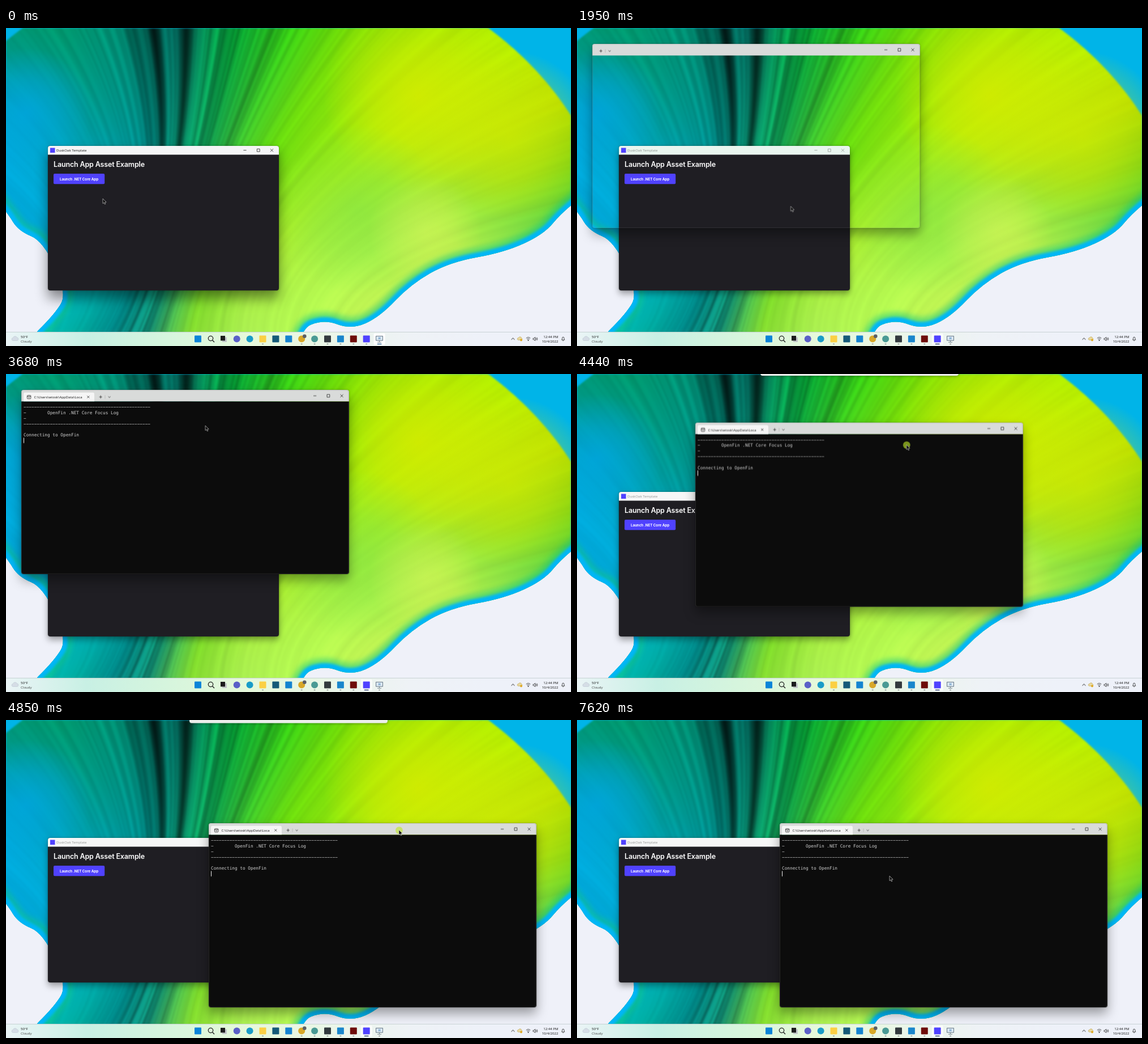
An HTML page with a canvas that plays this animation: 998x561 px, repeating every 8000 ms.

```html
<!DOCTYPE html>
<html lang="en">
<head>
<meta charset="utf-8">
<title>Desktop app launch</title>
<style>
  html, body { margin: 0; width: 100%; height: 100%; overflow: hidden; background: #eff1f9; }
  #stage { position: relative; width: 998px; height: 561px; overflow: hidden; }
  #stage > * { position: absolute; left: 0; top: 0; }
  svg { display: block; }
  text { font-family: "Open Sans", "Noto Sans", sans-serif; font-size: 6.1px; }
  .inter { font-family: Inter, Roboto, sans-serif; fill: #fff; }
  .heading { font-size: 12.5px; font-weight: 600; letter-spacing: -.16px; }
  .button { font-size: 6.2px; font-weight: 700; text-anchor: middle; }
  .mono { font-family: "DejaVu Sans Mono", "Noto Sans Mono", monospace; font-size: 7.76px; fill: #d0d0d0; }
  .line { fill: none; stroke: #222; stroke-width: .8; }
  #stage > .win { overflow: hidden; border-radius: 4px; }
  #stage > #app { left: 74px; top: 208px; width: 407.5px; height: 255.3px; }
  #stage > #term { left: 27px; top: 27.5px; width: 578.5px; height: 325px;
    box-shadow: 0 11px 20px rgba(0,0,0,.36), 0 0 3px rgba(0,0,0,.3); }
  #stage > #snap { left: 324px; top: -8px; width: 349.5px; height: 8px; border-radius: 0 0 4px 4px;
    background: #eceeec; box-shadow: 0 1px 4px rgba(0,0,0,.35); }
  #stage > #bar { top: 536px; }
</style>
</head>
<body>
<div id="stage">
  <canvas id="wall" width="998" height="561"></canvas>
  <div id="app" class="win"></div>
  <div id="term" class="win"></div>
  <div id="snap"></div>
  <svg id="bar" width="998" height="25" viewBox="0 536 998 25"></svg>
  <svg id="mouse" width="30" height="30" viewBox="-15 -15 30 30">
    <circle id="halo" cx=".4" cy=".6" r="6.4" fill="#bee628" fill-opacity=".62"/>
    <path id="arrow" d="M0 0V8.6L2 7L3.4 10L4.8 9.4L3.5 6.4L6.2 6.2Z" fill="#111" stroke="#ddd" stroke-width=".6"/>
    <path id="hand" d="M-.9 .8Q0 -.6 .9 .8V4.2L4.6 5.1Q5.6 5.5 5.3 7L4.5 11H-.2L-2.9 7.2Q-2.6 6 -.9 7.1Z" fill="#fff" stroke="#111" stroke-width=".7"/>
  </svg>
</div>
<script>
const LOOP = 8000;
const $ = id => document.getElementById(id);

// ---------- wallpaper ----------
const g = $('wall').getContext('2d');
const mix = (a, b, k) => a + (b - a) * k;
const bell = (x, mid, width) => Math.exp(-(((x - mid) / width) ** 2));
let seed = 11;
const rnd = () => (seed = (seed * 16807) % 2147483647) / 2147483647;

const palette = s => s.split(' ').map(h => [...h].map(c => parseInt(c, 16) * 17));
const ENDS = palette('0cf 0bf 0ae 0ad 098 096 086 055 0a2 3c0 8d0 ae0 be0 bd0 7c1 3c4 0be');
const WAIST = palette('0bf 0ad 0ac 088 195 6d1 ae1 ae4 be5');
const ROOTS = palette('3db 0ba 0a9 088 187 8d3 ae5 bf5 ce5');
function pick(colours, u) {
  const p = u * (colours.length - 1), i = Math.min(p | 0, colours.length - 2);
  return colours[i].map((c, j) => mix(c, colours[i + 1][j], p - i));
}

const RIM = [[-900, -900], [-60, 250], [2, 325], [22, 358], [66, 376], [108, 468], [86, 505], [30, 560], [0, 700],
  [500, 700], [515, 533], [562, 514], [610, 532], [660, 510], [715, 452], [784, 413], [880, 396], [950, 364],
  [982, 325], [1040, 280], [1900, -900]];

function rimPath() {
  const p = new Path2D();
  RIM.forEach(([x, y], i) => {
    const [nx, ny] = RIM[(i + 1) % RIM.length], mx = (x + nx) / 2, my = (y + ny) / 2;
    i ? p.quadraticCurveTo(x, y, mx, my) : p.moveTo(mx, my);
  });
  p.closePath();
  return p;
}

// Strands rise from the lower left, meet at a waist and fan out along an arc
function strands() {
  const c = document.createElement('canvas');
  c.width = 998; c.height = 561;
  const s = c.getContext('2d'), n = 520;
  let tone = 0;
  for (let i = 0; i <= n; i++) {
    const u = i / n, v = 2 * u - 1, a = 1.62 * v;
    const ex = 440 + 640 * Math.sin(a), ey = 430 - 560 * Math.cos(a);
    const cx = 340 + 400 * v ** 3, cy = 330 + 100 * v * v;
    const bx = 240 + 320 * v + 110 * v * v;
    tone = tone * .65 + (rnd() - .5) * 1.1;
    const wave = tone * (.03 + .3 * bell(v, -.08, .26));
    const dark = .95 * bell(v, -.19, .016) + .8 * bell(v, -.115, .02) + .4 * bell(v, -.235, .02);
    const grad = s.createLinearGradient(ex, ey, bx, 575);
    [ENDS, WAIST, ROOTS].forEach((set, j) => {
      const lum = (1 + wave) * (1 - dark * (1 - j * .45));
      grad.addColorStop(j / 2, `rgb(${pick(set, u).map(x => Math.min(255, x * lum) | 0)})`);
    });
    s.strokeStyle = grad;
    s.lineWidth = 10;
    s.beginPath();
    s.moveTo(ex, ey);
    s.quadraticCurveTo(cx, cy, bx, 575);
    s.stroke();
  }
  return c;
}

function glow(x, y, r, col, alpha) {
  const q = g.createRadialGradient(x, y, 0, x, y, r);
  q.addColorStop(0, `rgba(${col},${alpha})`);
  q.addColorStop(.5, `rgba(${col},${alpha * .6})`);
  q.addColorStop(1, `rgba(${col},0)`);
  g.fillStyle = q;
  g.fillRect(x - r, y - r, r * 2, r * 2);
}

function rimLight(rim, width, col, blur) {
  g.filter = `blur(${blur}px)`;
  g.strokeStyle = col;
  g.lineWidth = width;
  g.stroke(rim);
}

function paintWall() {
  const rim = rimPath();
  g.fillStyle = '#eff1f9';
  g.fillRect(0, 0, 998, 561);
  g.save();
  g.clip(rim);
  g.fillStyle = '#00b4e8';
  g.fillRect(0, 0, 998, 561);
  g.filter = 'blur(1.5px)';
  g.drawImage(strands(), 0, 0);
  g.filter = 'none';
  glow(35, 150, 115, '0,166,226', .8);
  glow(730, 120, 170, '212,234,0', .85);
  glow(890, 190, 150, '208,234,0', .7);
  glow(620, 320, 150, '126,226,70', .6);
  glow(740, 360, 100, '214,242,90', .55);
  rimLight(rim, 34, 'rgba(20,200,130,.5)', 5);
  rimLight(rim, 17, '#00b6f6', 2);
  g.restore();
}
paintWall();

// ---------- windows ----------
const text = (x, y, s, more = '') => `<text x="${x}" y="${y}" ${more}>${s}</text>`;
const rect = (x, y, w, h, fill, more = '') => `<rect x="${x}" y="${y}" width="${w}" height="${h}" fill="${fill}" ${more}/>`;
const line = (d, more = '') => `<path class="line" d="${d}" ${more}/>`;
const cross = (x, y, r) => line(`M${x - r} ${y - r}L${x + r} ${y + r}M${x + r} ${y - r}L${x - r} ${y + r}`);
const controls = (x, y) => line(`M${x - 2.6} ${y}h5.2`) +
  line(`M${x + 21.4} ${y - 2.4}h4.8v4.8h-4.8z`) + cross(x + 47.5, y, 2.5);
const svg = (box, body) => {
  const [, , w, h] = box.split(' ');
  return `<svg width="${w}" height="${h}" viewBox="${box}">${body}</svg>`;
};

$('app').innerHTML = svg('74 208 408 256',
  rect(74, 208, 408, 256, '#1f1e23') +
  rect(74, 208, 408, 15.5, '#f4f5f6', 'id="cap"') +
  rect(78, 211.5, 8.5, 8.5, '#5042ff') +
  `<g id="capText">${text(89, 218.2, 'DuskOak Template', 'fill="#1a1a1a"')}${controls(422, 215.7)}</g>` +
  text(84, 244.8, 'Launch App Asset Example', 'class="inter heading"') +
  rect(84, 257, 90.2, 18.3, '#5042ff', 'rx="2"') +
  text(129, 268.7, 'Launch .NET Core App', 'class="inter button"'));

const mono = (x, row, s) => text(x, 60.5 + row * 9.88, s, 'class="mono"');
const dash = '\u2212';
$('term').innerHTML = svg('27 27.5 579 325',
  rect(27, 48, 579, 305, '#0c0c0c', 'id="body"') +
  rect(27, 27, 579, 21, '#d9dbda') +
  `<g id="tab"><path d="M31 48V35q0-3 3-3h119q3 0 3 3v13z" fill="#f5f5f5"/>
    <rect x="37.4" y="37.2" width="6.4" height="6" rx="1" class="line"/>${line('M37.4 39h6.4M39.3 41h2.6')}
    <svg x="49.5" y="32" width="85.5" height="16">${text(0, 10.6, 'C:\\Users\\wtosk\\AppData\\Loca', 'fill="#111"')}</svg>
    ${cross(145.3, 40, 2)}</g>` +
  `<g id="plus">${line('M39.6 40h5.2M42.2 37.4v5.2')}${line('M55.6 39.2l2 1.8l2-1.8')}${line('M50 37v6', 'stroke-opacity=".2"')}</g>` +
  controls(545.6, 38) +
  `<g id="head">${mono(31, 0, dash.repeat(48))}${mono(31, 1, dash)}${mono(73, 1, 'OpenFin .NET Core Focus Log')}${mono(31, 2, dash)}${mono(31, 3, dash.repeat(48))}</g>` +
  `<g id="link">${mono(31, 5, 'Connecting to OpenFin')}</g>` +
  `<g id="caretRow">${rect(31, 92.2, 1, 9.4, '#f2f2f2', 'id="caret"')}</g>` +
  rect(27.25, 27.75, 578, 324.5, 'none', 'rx="4" stroke="#777" stroke-opacity=".6" stroke-width=".6"'));

// ---------- taskbar ----------
const slot = i => 339 + i * 22.9;
const square = (i, col) => rect(slot(i) - 6, 542.5, 12, 12, col, 'rx="1"');
const disc = (i, col) => `<circle cx="${slot(i)}" cy="548.5" r="6" fill="${col}"/>`;
const mark = (i, w, col, id = '') => rect(slot(i) - w / 2, 556.7, w, 1.6, col, `rx=".8" ${id}`);
const lit = (i, alpha, id) => rect(slot(i) - 10, 538.8, 20, 20, '#fff', `rx="2" fill-opacity="${alpha}" id="${id}"`);
const dot = (i, id) => mark(i, 3, '#8a9090', id);
const mica = ['#eaf4f6', '#c8f0e4', '#d6f5dd', '#e6f8da', '#eaf6e8', '#eef2f6', '#eef1f9', '#eef1f9'];

$('bar').innerHTML =
  `<linearGradient id="mica">${mica.map((c, i) => `<stop offset="${i / 7}" stop-color="${c}"/>`).join('')}</linearGradient>` +
  rect(0, 536, 998, 25, 'url(#mica)') + rect(0, 536, 998, .7, '#b9c6c6') +
  '<path d="M12 551.5a2.6 2.6 0 0 1 .4-5.1a3.8 3.8 0 0 1 7-.5a2.9 2.9 0 0 1 .6 5.6z" fill="#d5dde6" stroke="#b4c0cc" stroke-width=".5"/>' +
  text(26, 546.8, '50°F', 'fill="#111"') + text(26, 555, 'Cloudy', 'fill="#444"') +
  lit(13, .7, 'litA') + lit(14, 1, 'litB') +
  square(0, '#0a84d8') + disc(3, '#5b5fc7') + disc(4, '#1a9cc8') + square(5, '#fbd043') + square(6, '#155a78') +
  square(7, '#1584d0') + disc(8, '#d8a828') + disc(9, '#4a9a94') + square(10, '#333a3e') + square(11, '#1a86cc') +
  square(12, '#6e0c0a') + square(13, '#5042ff') +
  '<circle cx="361.5" cy="547.6" r="4.2" class="line" style="stroke-width:1.3"/>' + line('M364.6 550.8l3.4 3.4', 'style="stroke-width:1.4"') +
  rect(382, 545.5, 8, 8.5, '#c2c6c8') + rect(379, 543, 8, 8.5, '#1c1c1c') +
  '<circle cx="527.3" cy="543.8" r="3.3" fill="#5c5f66"/>' +
  '<rect x="653.6" y="543.6" width="11.8" height="7.6" fill="#dce9f4" stroke="#5a6b7a" stroke-width=".9"/>' +
  line('M659.5 551.5v2.6M656 554.3h7', 'style="stroke:#5a6b7a"') + rect(657.6, 545.6, 4, 3.4, '#8fb4d4') +
  [5, 8, 9, 10, 11, 12].map(i => dot(i)).join('') +
  dot(13, 'id="dotA"') + mark(13, 8, '#3b4a78', 'id="barA"') +
  dot(14, 'id="dotB"') + mark(14, 8, '#3b6a98', 'id="barB"') +
  line('M892.6 549.8l2.9-2.8l2.9 2.8', 'style="stroke-width:1"') +
  '<path d="M905 550.5a2 2 0 0 1 .5-4a2.6 2.6 0 0 1 5 .4a1.9 1.9 0 0 1 0 3.6z" fill="#e8d9a0" stroke="#b09030" stroke-width=".5"/><circle cx="910" cy="550.5" r="2" fill="#e0a820"/>' +
  line('M918.8 547.2q3.7-3.2 7.4 0M920.2 549q2.3-2 4.6 0') + '<circle cx="922.5" cy="551" r="1" fill="#222"/>' +
  line('M931 547.4h1.5l2.3-2v6.4l-2.3-2h-1.5zM936.3 547q1.2 1.5 0 3M937.7 545.8q2.2 2.7 0 5.4') +
  text(975.5, 546.8, '12:44 PM', 'text-anchor="end" fill="#111"') + text(975.5, 555, '10/4/2022', 'text-anchor="end" fill="#111"') +
  line('M981.5 550.2q1-1 1-3q0-2 1.6-2q1.7 0 1.7 2q0 2 1 3zM983.2 551.7h1.8');

// ---------- motion ----------
function track(id, steps, style, hold) {
  const all = [[0, ...steps[0].slice(1)], ...steps, [LOOP, ...steps[steps.length - 1].slice(1)]];
  $(id).animate(all.map(([t, ...v]) => ({
    offset: t / LOOP, easing: hold ? 'steps(1, end)' : 'linear', ...style(...v)
  })), { duration: LOOP, iterations: Infinity });
}
const fade = o => ({ opacity: o });
const move = (x, y, s = 1) => ({ transform: `translate(${x}px, ${y}px) scale(${s})` });
const flip = (id, first, ...times) =>
  track(id, [[0, first], ...times.map((t, i) => [t, (i + 1 + first) % 2])], fade, true);

// The window trails the pointer by a fixed lag while it is dragged
const GRAB = [363, 40], LAG = 40;
const drag = [[4200, ...GRAB], [4400, 544, 97], [4440, 581, 124], [4540, 665.5, 191.5], [4800, 694, 194]];
track('mouse', [
  [70, 171, 301], [780, 141, 267], [1470, 141, 267], [1950, 377.5, 314.5], [2500, 376, 304], [2910, 376, 304],
  [3120, 401, 262], [3680, 352, 91], ...drag,
  [5080, 694, 194], [5320, 680, 201], [5760, 574, 348], [5940, 556.5, 339], [6150, 550.5, 281], [6560, 552, 275]
], (x, y) => move(x - 15, y - 15));
flip('hand', 0, 600, 1520);
flip('arrow', 1, 600, 1520);
flip('halo', 0, 1200, 1250, 4170, 5110);

track('term', [[1820, 0, 0, .94], [1930, 0, 0, 1],
  ...drag.map(([t, x, y]) => [t + LAG, x - GRAB[0], y - GRAB[1], 1])], move);
track('term', [[1820, 0], [1930, 1]], fade);
track('body', [[2080, 0], [2190, 1]], fade);
flip('tab', 0, 2290);
track('plus', [[0, 0], [2290, 125]], x => move(x, 0), true);
flip('head', 0, 2640);
flip('link', 0, 2910);
track('caretRow', [[0, 0], [2910, 19.76]], y => move(0, y), true);
const blinks = [2640];
for (let t = 2850; t < LOOP; t += 530) blinks.push(t);
flip('caret', 0, ...blinks);

track('snap', [[4360, 0], [4440, 3], [4580, 5.5], [5080, 5.5], [5250, 0]], y => ({ ...move(0, y), opacity: y ? 1 : 0 }));
track('app', [[1820, 14, 22, .45], [1940, 6, 12, .35]],
  (y, blur, a) => ({ boxShadow: `0 ${y}px ${blur}px rgba(0,0,0,${a}), 0 0 3px rgba(0,0,0,.3)` }));
track('capText', [[1820, 1], [1930, .45]], fade);
track('cap', [[1820, '#f4f5f6'], [1940, '#e8f6ee'], [2080, '#f6f7f7']], c => ({ fill: c }));

for (const id of ['litA', 'barA', 'dotB']) track(id, [[90, 0], [260, 1]], fade);
for (const id of ['litB', 'barB', 'dotA']) track(id, [[90, 1], [260, 0]], fade);
</script>
</body>
</html>
```
